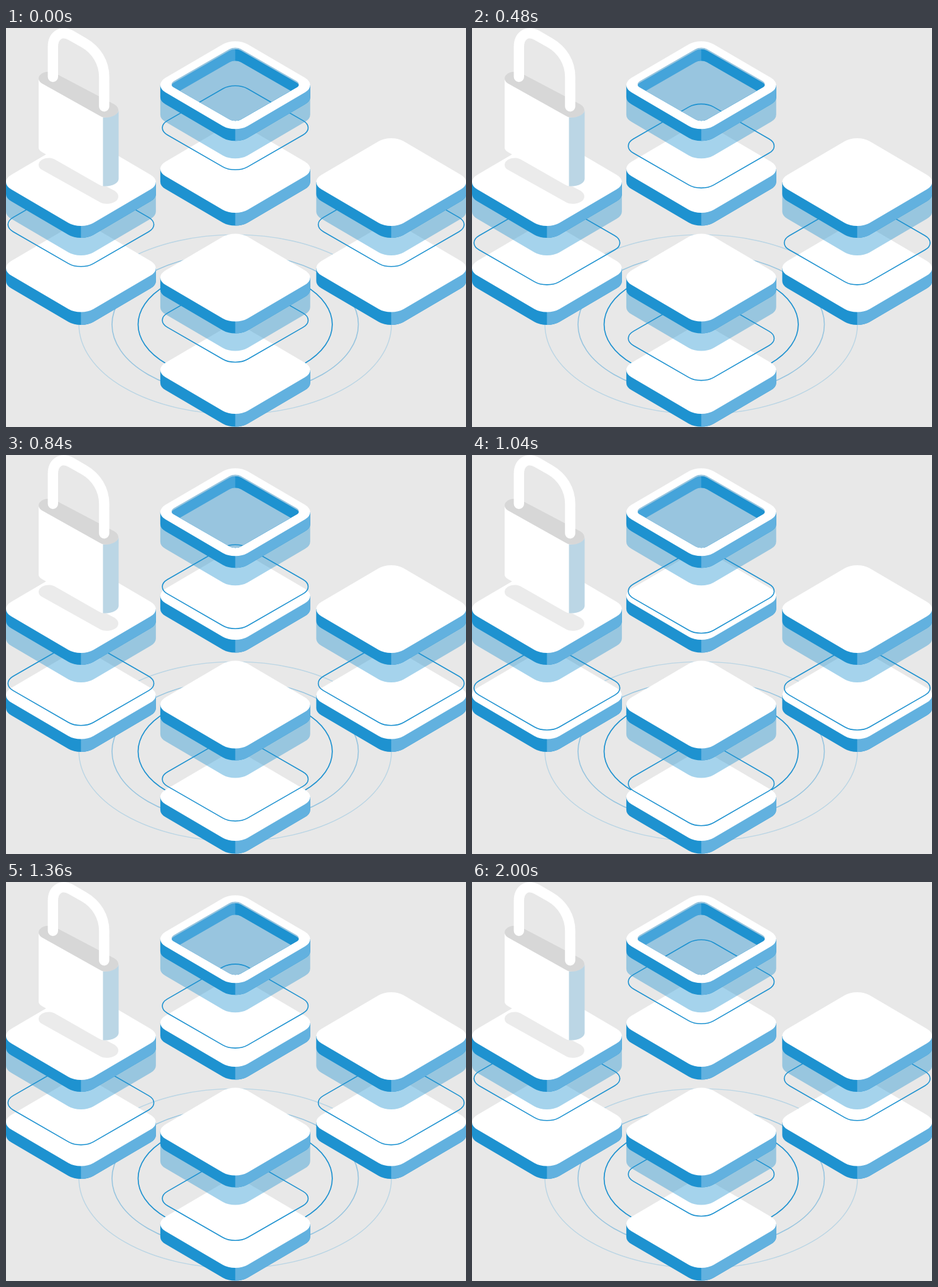
Write an HTML page with a canvas that moves like this. It is 733x637 px and loops after 2.02 s.

```html
<!DOCTYPE html>
<html lang="en">
<head>
<meta charset="utf-8">
<title>Isometric blocks</title>
<style>
  html, body { margin: 0; width: 100%; height: 100%; overflow: hidden; background: #e8e8e8; }
  canvas { display: block; }
</style>
</head>
<body>
<canvas id="stage" width="733" height="637"></canvas>
<script>
const ctx = document.getElementById('stage').getContext('2d');
const BLUE = '#1e92d0', SKY = '#62b1df', PALE = '#98c5df';
const W = 119.4, H = 70, R = 28;

// Rounded rhombus around the origin
function rhombus(w, h, r) {
  const k = h / w, a = r * Math.SQRT1_2, b = r - a;
  const arc = `A${r} ${r * k} 0 0 1 `;
  return new Path2D(
    `M${-w + b} ${-a * k}L${-a} ${-h + b * k}${arc}${a} ${-h + b * k}` +
    `L${w - b} ${-a * k}${arc}${w - b} ${a * k}` +
    `L${a} ${h - b * k}${arc}${-a} ${h - b * k}` +
    `L${-w + b} ${a * k}${arc}${-w + b} ${-a * k}Z`);
}

// Side of a block, from the middle of its face down
function wall(depth) {
  const k = H / W, a = R * Math.SQRT1_2, b = R - a;
  const arc = `A${R} ${R * k} 0 0 1 `;
  const low = depth + H - b * k, corner = depth + a * k;
  return new Path2D(
    `M${-W} 0H${W}V${depth}${arc}${W - b} ${corner}` +
    `L${a} ${low}${arc}${-a} ${low}` +
    `L${-W + b} ${corner}${arc}${-W} ${depth}Z`);
}

const face = rhombus(W, H, R);
const ring = rhombus(116.2, 67, R);
const hole = rhombus(101.5, 58.5, 13);
const band = wall(47);

function at(x, y, draw) {
  ctx.save();
  ctx.translate(x, y);
  draw();
  ctx.restore();
}

function fill(path, color) {
  ctx.fillStyle = color;
  ctx.fill(path);
}

function fillHalves(path, left, right) {
  fill(path, left);
  ctx.save();
  ctx.beginPath();
  ctx.rect(0, -150, 150, 300);
  ctx.clip();
  fill(path, right);
  ctx.restore();
}

function slab(x, y, depth) {
  at(x, y, () => {
    fillHalves(wall(depth), BLUE, SKY);
    fill(face, '#fff');
  });
}

function drawRing(x, y) {
  at(x, y, () => {
    ctx.strokeStyle = BLUE;
    ctx.lineWidth = 1.6;
    ctx.stroke(ring);
  });
}

function column(x, upper, ringY, lower) {
  slab(x, lower, 20.5);
  drawRing(x, ringY);
  at(x, upper, () => fill(band, 'rgba(30,145,207,.4)'));
  slab(x, upper, 19);
}

function hollow(x, y, ringY) {
  at(x, y, () => {
    ctx.clip(hole);
    fill(hole, PALE);
    at(0, 2.7, () => fillHalves(hole, '#45a4da', BLUE));
    at(0, 21.3, () => fill(hole, PALE));
    drawRing(0, ringY - y);
  });
}

function orbit(rx, color, width) {
  ctx.beginPath();
  ctx.ellipse(365.2, 473.3, rx, rx * .576, 0, 0, 7);
  ctx.strokeStyle = color;
  ctx.lineWidth = width;
  ctx.stroke();
}

const pill = new Path2D('M52 81C52 72 66 67 77 71.5L171 121C184 128 180 139 168 142C162 143.5 156 143.5 150 140.5L58 89Q52 86 52 81Z');
const lockFront = new Path2D('M52 82Q53 86 58 89L148 139.5Q152 142 155 142.7V252.5Q152 252 148 250L58 198.5Q52 195 52 191Z');
const lockSide = new Path2D('M154.5 142.7C168 144 179.5 138 179.5 131V241C179.5 248 168 253.5 154.5 252.5Z');
const shackle = new Path2D('M74.8 78V30C74.8 12 88 3 104 12L124 23.5C144 35 156.4 55 156.4 78V125.3');

function padlock() {
  at(0, 137.7, () => fill(pill, '#ebebeb'));
  fill(pill, '#d7d7d7');
  fill(lockFront, '#fff');
  fill(lockSide, '#bbd6e5');
  ctx.strokeStyle = '#fff';
  ctx.lineWidth = 16.4;
  ctx.lineCap = 'round';
  ctx.stroke(shackle);
}

function frame(now) {
  const t = Math.floor(now % 2020 / 20) * 20;
  const drop = 60.6 * (1 - Math.abs(t - 1000) / 1000);

  ctx.fillStyle = '#e8e8e8';
  ctx.fillRect(0, 0, 733, 637);
  orbit(249, '#bad5e4', 1.4);
  orbit(196.3, PALE, 1.6);
  orbit(154.7, BLUE, 1.7);

  column(365.3, 91.2, 159.3 + drop, 225);
  hollow(365.3, 89.8, 159.3 + drop);
  column(119.4, 246, 313.8 + drop, 383.5);
  padlock();
  column(613.8, 246, 313.8 + drop, 383.5);
  column(365.3, 398.5, 466.5 + drop, 546);
  requestAnimationFrame(frame);
}
requestAnimationFrame(frame);
</script>
</body>
</html>
```
